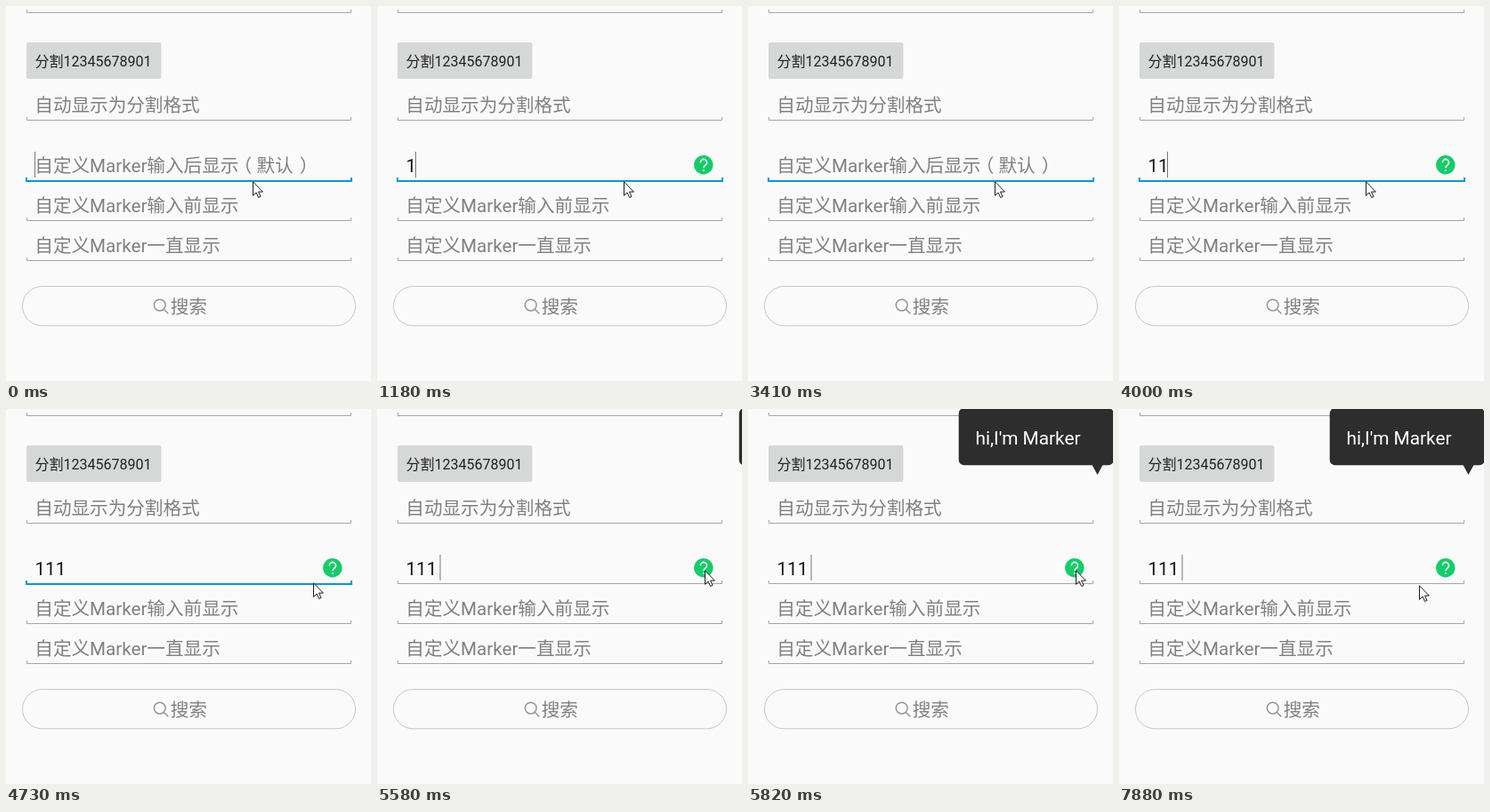
Write an HTML page that moves like this. It is 410x422 px and loops after 8 s.

```html
<!DOCTYPE html>
<html lang="zh-CN">
<head>
<meta charset="utf-8">
<style>
  html, body { margin: 0; width: 100%; height: 100%; overflow: hidden; background: #fafafa; }
  svg { display: block; }
  text { font: 20.6px Roboto, "Noto Sans CJK SC", "Noto Sans CJK", sans-serif; fill: #808080; white-space: pre; }
  .label { font-size: 16px; fill: #222; }
  .typed { fill: #181818; }
  .tip { fill: #2d2d2d; }
  .tip text { font-size: 20.8px; fill: #fff; }
  .line { fill: none; stroke: #a6a6a6; }
  .focus { fill: none; stroke: #0a98ca; stroke-width: 2; }
</style>
</head>
<body>
<svg width="410" height="422" viewBox="0 0 410 422">
  <defs>
    <path id="line" class="line" d="M23.5 -3V.5H387.5V-3"/>
  </defs>
  <rect width="410" height="422" fill="#fafafa"/>

  <use href="#line" y="7"/>
  <use href="#line" y="128"/>
  <use href="#line" y="241"/>
  <use href="#line" y="286"/>

  <rect x="23" y="41" width="151.4" height="41" rx="2" fill="#d6d7d7"/>
  <text class="label" x="32.5" y="67.7">分割12345678901</text>

  <text x="32.3" y="119">自动显示为分割格式</text>
  <text x="32.3" y="232">自定义Marker输入前显示</text>
  <text x="32.3" y="277">自定义Marker一直显示</text>

  <use id="idleLine" href="#line" y="196"/>
  <path id="focusLine" class="focus" d="M23 193V197H388V193"/>
  <text id="hint" x="32.3" y="187">自定义Marker输入后显示<tspan dx="-5.5">（</tspan><tspan dx="5">默认</tspan><tspan dx="7">）</tspan></text>
  <text id="typed" class="typed" x="32.5" y="187"></text>
  <rect id="caret" y="164" width="1" height="29" fill="#777"/>
  <g id="help">
    <circle cx="366.8" cy="178.8" r="10.7" fill="#14cc69"/>
    <path d="M363.3 176.2a3.6 3.6 0 1 1 5.8 2.7q-2.2 1.5-2.2 3.4" fill="none" stroke="#fff" stroke-width="1.6"/>
    <circle cx="366.9" cy="185" r="1.1" fill="#fff"/>
  </g>

  <rect x="18.5" y="315.5" width="374" height="44.3" rx="22.1" fill="none" stroke="#c6c6c6"/>
  <g fill="none" stroke="#949494" stroke-width="1.5">
    <circle cx="172.7" cy="336.6" r="6.4"/>
    <path d="M177.3 341.2L182.3 346.2"/>
  </g>
  <text x="184.7" y="346">搜索</text>

  <g id="tip" class="tip">
    <path d="M386 62H399L392.5 74Z"/>
    <rect x="236.7" y="-1" width="174" height="64.3" rx="6"/>
    <text x="255.5" y="40">hi,I'm Marker</text>
  </g>

  <path id="pointer" d="M.5 .8V16.4L4.1 13L6.6 18.5L9 17.5L6.5 12.1H11.4Z" fill="#fff" stroke="#1c1c24"/>
</svg>
<script>
  const LOOP = 8000;
  const KEY_TIMES = [1180, 1320, 1600, 2420, 2580, 2850, 3690, 4000, 4270];
  const BLINK = { on: 460, period: 1030 };
  const BLUR_AT = 5460;   // field loses focus and the tip starts to slide
  const LEAVE_AT = 7880;

  const el = id => document.getElementById(id);
  const show = (id, on) => el(id).setAttribute("visibility", on ? "visible" : "hidden");
  const move = (id, x, y) => el(id).setAttribute("transform", `translate(${x} ${y})`);

  // Progress from 0 to 1 in `count` hard steps, each lasting `step` ms.
  const stepped = (t, start, step, count) =>
    Math.max(0, Math.min(count, Math.floor((t - start) / step))) / count;

  function pointerAt(t) {
    if (t >= LEAVE_AT) return [337, 198];
    const p = stepped(t, 4430, 140, 5);
    return [277 + 91 * (1 - (1 - p) ** 2.7), 197 - 16 * p ** 2.5].map(Math.round);
  }

  function render(t) {
    // Three digits are typed, erased and typed again.
    const keys = KEY_TIMES.filter(time => time <= t).length;
    const digits = keys < 3 ? keys : Math.abs(6 - keys);
    const gap = digits === 3 ? 5.5 : 0;
    const sinceKey = Math.min(t, BLUR_AT) - (KEY_TIMES[keys - 1] ?? 0);
    const focused = t < BLUR_AT;

    el("typed").textContent = "1".repeat(digits);
    el("caret").setAttribute("x", 32 + 11 * digits + gap);
    show("caret", sinceKey % BLINK.period < BLINK.on);
    show("hint", !digits);
    show("help", digits);
    show("focusLine", focused);
    show("idleLine", !focused);
    move("tip", 255 * (1 - stepped(t, BLUR_AT, 120, 3)), 0);
    move("pointer", ...pointerAt(t));
  }

  const begin = performance.now();
  function tick() {
    render((performance.now() - begin) % LOOP);
    requestAnimationFrame(tick);
  }
  render(0);
  requestAnimationFrame(tick);
</script>
</body>
</html>
```
